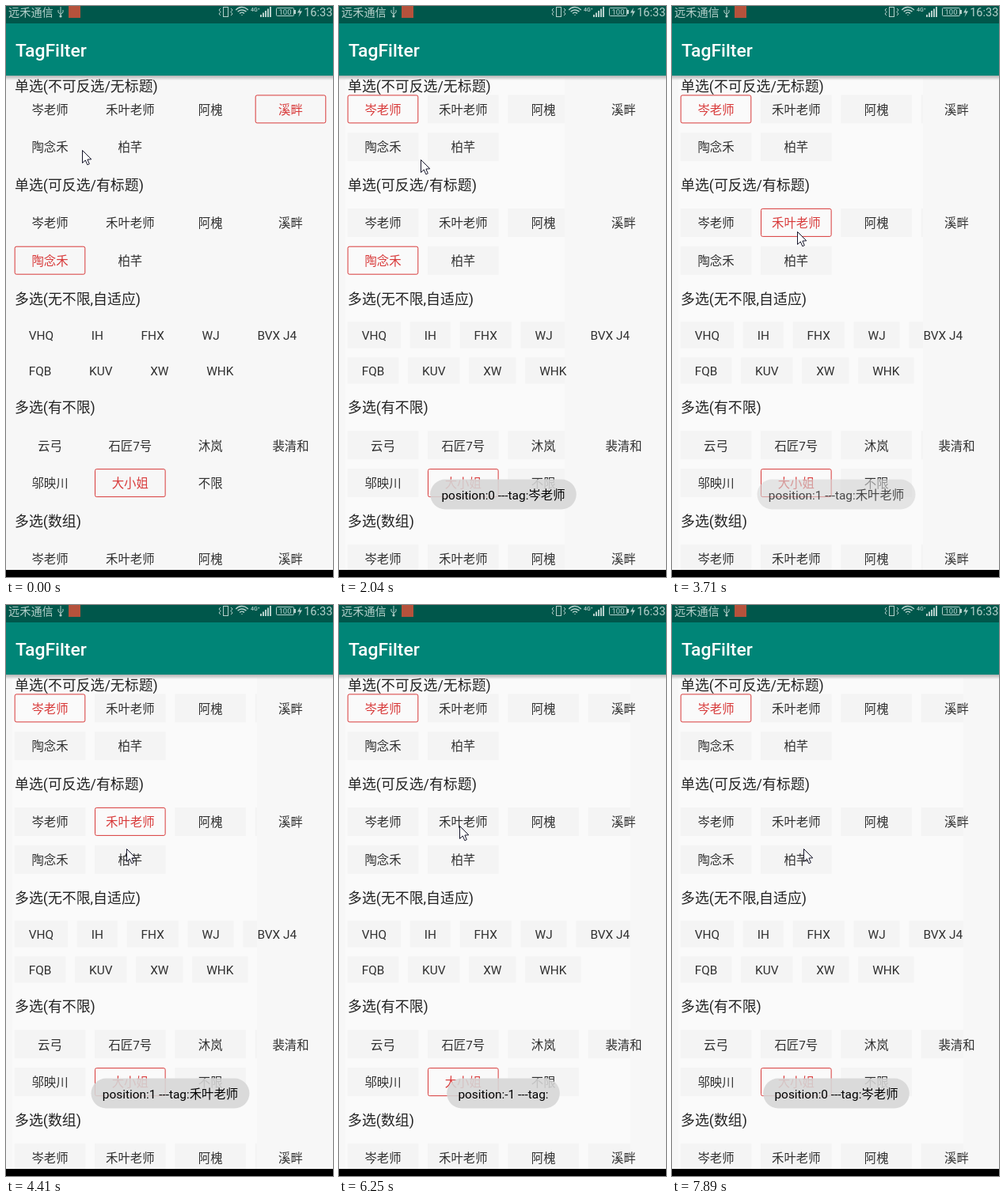
Write an HTML page with a canvas that moves like this. It is 413 px wide and 722 px high and loops after 8 s.

```html
<!DOCTYPE html>
<html lang="zh-CN">
<head>
<meta charset="utf-8">
<title>TagFilter</title>
<style>
html, body { margin: 0; width: 100%; height: 100%; overflow: hidden; background: #f7f7f7; }
canvas { display: block; width: 413px; height: 722px; }
</style>
</head>
<body>
<canvas id="stage"></canvas>
<script>
const W = 413, H = 722, LOOP = 8000;
const FONT = "Roboto, 'Noto Sans CJK SC', 'Noto Sans CJK', sans-serif";
const RED = '#d83a3a', INK = '#303030', STATUS = '#b5d0cb';
const TAG_SIZE = 15.4, LEFT = 10.67, GAP = 11.7, COLUMN = 89.63;

const canvas = document.getElementById('stage');
const dpr = window.devicePixelRatio || 1;
canvas.width = W * dpr;
canvas.height = H * dpr;
const ctx = canvas.getContext('2d');

const people = ['岑老师', '禾叶老师', '阿槐', '溪畔', '陶念禾', '柏芊'];
const teams = ['VHQ', 'IH', 'FHX', 'WJ', 'BVX J4', 'FQB', 'KUV', 'XW', 'WHK'];
const heroes = ['云弓', '石匠7号', '沐岚', '裴清和', '邬映川', '大小姐', '不限'];

const sections = [
  { title: '单选(不可反选/无标题)', names: people, selected: 3 },
  { title: '单选(可反选/有标题)', names: people, selected: 4 },
  { title: '多选(无不限,自适应)', names: teams, selected: -1, fit: true },
  { title: '多选(有不限)', names: heroes, selected: 5 },
  { title: '多选(数组)', names: people.slice(0, 4), selected: -1 }
];

// Each click changes a selection; its toast follows later
const clicks = [
  { at: 1440, section: 0, index: 0, toast: 1590 },
  { at: 2880, section: 1, index: 1, toast: 3560 },
  { at: 5530, section: 1, index: -1, toast: 5680 },
  { at: 7330, section: 0, index: 0, toast: 7480 }
];

const start = { x: 96, y: 182 };
const stops = [
  { from: 590, to: 800, x: 143, y: 162 },
  { from: 800, to: 1160, x: 57, y: 128 },
  { from: 1590, to: 2610, x: 160, y: 277 },
  { from: 3560, to: 4130, x: 152, y: 308 },
  { from: 4680, to: 5250, x: 152, y: 279 },
  { from: 6250, to: 6920, x: 66, y: 130 },
  { from: 7480, to: 7890, x: 166, y: 308 }
];

const clamp = v => Math.max(0, Math.min(1, v));

function setFont(size, weight = 400) {
  ctx.font = `${weight} ${size}px ${FONT}`;
}

function text(str, x, y, size, color, align = 'left', weight = 400) {
  setFont(size, weight);
  ctx.textAlign = align;
  ctx.fillStyle = color;
  ctx.fillText(str, x, y + size * 0.36);
}

function rect(x, y, w, h, color) {
  ctx.fillStyle = color;
  ctx.fillRect(x, y, w, h);
}

function path(points, close) {
  ctx.beginPath();
  points.forEach(([x, y]) => ctx.lineTo(x, y));
  if (close) ctx.closePath();
}

function round(x, y, w, h, r) {
  ctx.beginPath();
  ctx.roundRect(x, y, w, h, r);
}

// Stacks the sections and wraps their tags into rows
function layout() {
  let y = 102;
  setFont(TAG_SIZE);
  sections.forEach((s, n) => {
    s.y = y;
    y += n ? 29.3 : 10.4;
    const h = s.fit ? 33.2 : 36;
    let x = LEFT;
    s.tags = s.names.map(name => {
      const w = s.fit ? ctx.measureText(name).width + 36 : COLUMN;
      if (x + w > W - 8) {
        x = LEFT;
        y += h + 11.8;
      }
      const tag = { name, x, y, w, h };
      x += w + GAP;
      return tag;
    });
    y += h + 30.4;
  });
}

function selection(t) {
  const chosen = sections.map(s => s.selected);
  for (const c of clicks) if (t >= c.at) chosen[c.section] = c.index;
  return chosen;
}

// The tag backgrounds show only where the screen has been refreshed
function drawRefreshed(t, chosen) {
  if (t < clicks[0].at) return;
  const edge = t < 3560 ? 285 : t < 5530 ? 317 : 368;
  ctx.save();
  ctx.beginPath();
  if (t < clicks[0].toast) ctx.rect(11, 108, 394, 43);
  else ctx.rect(8, 92, edge - 8, 621);
  ctx.clip();
  rect(0, 88, W, 625, '#fafafa');
  sections.forEach((s, n) => s.tags.forEach((tag, i) => {
    if (i !== chosen[n]) rect(tag.x, tag.y, tag.w, tag.h, '#f4f4f4');
  }));
  ctx.restore();
}

function drawTags(chosen) {
  sections.forEach((s, n) => {
    text(s.title, 11, s.y, 17.9, '#222');
    s.tags.forEach((tag, i) => {
      const on = i === chosen[n];
      if (on) {
        round(tag.x + 0.5, tag.y + 0.5, tag.w - 1, tag.h - 1, 2);
        ctx.strokeStyle = RED;
        ctx.lineWidth = 1;
        ctx.stroke();
      }
      text(tag.name, tag.x + tag.w / 2, tag.y + tag.h / 2 + 0.7, TAG_SIZE, on ? RED : INK, 'center');
    });
  });
}

function drawStatus() {
  rect(0, 0, W, 22, '#00574b');
  text('远禾通信', 3, 8, 14.2, STATUS);
  rect(79, 0, 15, 15, '#b5523c');

  ctx.strokeStyle = ctx.fillStyle = STATUS;
  ctx.lineWidth = 1;
  // USB
  path([[69, 1], [69, 13]]); ctx.stroke();
  path([[66, 5], [66, 8], [69, 10.5], [72, 8], [72, 5]]); ctx.stroke();
  ctx.beginPath(); ctx.arc(69, 13, 1.6, 0, 7); ctx.fill();
  // Vibration
  ctx.strokeRect(274.5, 1.5, 6, 12);
  for (const [x, d] of [[271, -2], [284, 2]]) {
    path([3, 5, 7.5, 10, 12].map((y, i) => [x + (i % 2) * d, y]));
    ctx.stroke();
  }
  // Wi-Fi
  ctx.lineWidth = 1.5;
  for (let r = 0.5; r < 11; r += 3.3) {
    ctx.beginPath();
    ctx.arc(298, 12, r, -Math.PI * 0.77, -Math.PI * 0.23);
    ctx.stroke();
  }
  text('4G⁺', 309, 4, 7, STATUS, 'left', 500);
  for (let i = 0; i < 5; i++) rect(321 + i * 3, 11 - i * 2.5, 2, 3 + i * 2.5, STATUS);
  // Battery
  ctx.lineWidth = 1;
  round(341.5, 2.5, 22, 10, 1); ctx.stroke();
  rect(364, 5, 2, 5, STATUS);
  text('100', 352.5, 7.7, 9.5, STATUS, 'center');
  path([[372, 2], [368, 8.5], [371, 8.5], [369.5, 14], [374, 6.5], [371, 6.5]], true);
  ctx.fill();
  text('16:33', 412.5, 8, 14.6, STATUS, 'right');
}

function drawBars() {
  const shade = ctx.createLinearGradient(0, 88, 0, 94);
  shade.addColorStop(0, 'rgba(0,0,0,.28)');
  shade.addColorStop(1, 'rgba(0,0,0,0)');
  rect(0, 88, W, 6, shade);
  rect(0, 22, W, 66, '#008577');
  text('TagFilter', 12, 56, 22.94, '#fff', 'left', 500);
  drawStatus();
  rect(0, 713, W, 9, '#000');
}

function drawToast(t) {
  clicks.forEach((c, i) => {
    const end = i + 1 < clicks.length ? clicks[i + 1].toast : Infinity;
    const alpha = Math.min(clamp((t - c.toast) / 220), clamp(1 - (t - end) / 140));
    if (alpha <= 0) return;
    const name = sections[c.section].names[c.index] || '';
    const message = `position:${c.index} ---tag:${name}`;
    setFont(15.4);
    const w = ctx.measureText(message).width + 28.5;
    ctx.globalAlpha = alpha;
    round(207.5 - w / 2, 598.5, w, 38, 19);
    ctx.fillStyle = 'rgba(214,214,214,.88)';
    ctx.fill();
    text(message, 207.5, 618, 15.4, '#000', 'center');
    ctx.globalAlpha = 1;
  });
}

function pointerAt(t) {
  let { x, y } = start;
  for (const s of stops) {
    const p = clamp((t - s.from) / (s.to - s.from));
    x += (s.x - x) * p;
    y += (s.y - y) * p;
  }
  return [x, y];
}

function drawPointer(t) {
  const [x, y] = pointerAt(t);
  ctx.save();
  ctx.translate(Math.round(x) + 0.5, Math.round(y) + 0.5);
  path([[0, 0], [0, 16], [3.8, 12.5], [6.3, 18.3], [8.8, 17.2], [6.4, 11.6], [11.3, 11.3]], true);
  ctx.fillStyle = '#fff';
  ctx.fill();
  ctx.strokeStyle = '#15152a';
  ctx.lineWidth = 1;
  ctx.stroke();
  ctx.restore();
}

const origin = performance.now();

function frame() {
  const t = (performance.now() - origin) % LOOP;
  const chosen = selection(t);
  ctx.setTransform(dpr, 0, 0, dpr, 0, 0);
  rect(0, 0, W, H, '#f7f7f7');
  drawRefreshed(t, chosen);
  drawTags(chosen);
  drawBars();
  drawToast(t);
  drawPointer(t);
  requestAnimationFrame(frame);
}

layout();
frame();
</script>
</body>
</html>
```
